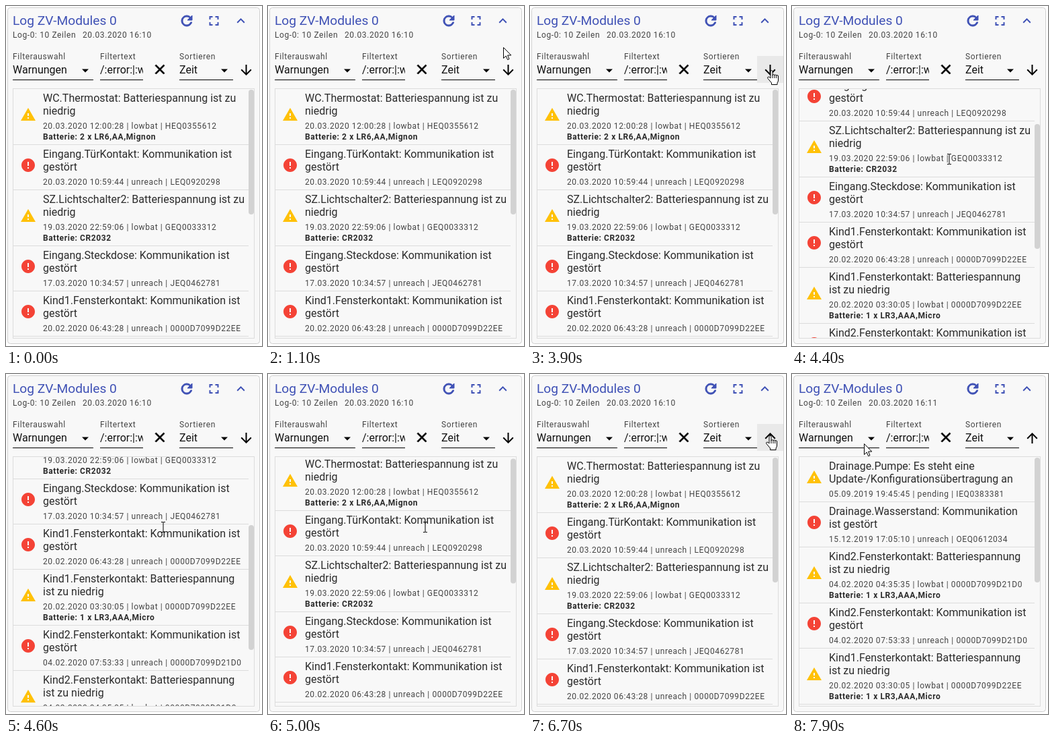
Write an HTML page that moves like this. It is 381x504 px and loops after 8000 ms.

```html
<!DOCTYPE html>
<html lang="de">
<head>
<meta charset="utf-8">
<style>
  html, body { margin: 0; width: 100%; height: 100%; overflow: hidden; background: #fff; }
  svg { display: block; }
  text { font: 16px Roboto, sans-serif; fill: #2b2b2b; white-space: pre; }
  .title { font-size: 19.2px; fill: #3f51b5; }
  .small { font-size: 12px; letter-spacing: .6px; fill: #444; }
  .bold { font-weight: 700; fill: #2b2b2b; }
  .value { fill: #111; }
  .blue { fill: #3f51b5; }
  .warn { fill: #ffc107; }
  .error { fill: #f44336; }
  .cursor path { fill: #fff; stroke: #000; stroke-linejoin: round; }
</style>
</head>
<body>
<svg id="stage" width="381" height="504" viewBox="0 0 381 504"></svg>
<script>
const ICONS = {
  refresh: 'M17.65 6.35C16.2 4.9 14.21 4 12 4c-4.42 0-7.99 3.58-7.99 8s3.57 8 7.99 8c3.73 0 6.84-2.55 7.73-6h-2.08c-.82 2.33-3.04 4-5.65 4-3.31 0-6-2.69-6-6s2.69-6 6-6c1.66 0 3.14.69 4.22 1.78L13 11h7V4l-2.35 2.35z',
  full: 'M7 14H5v5h5v-2H7v-3zm-2-4h2V7h3V5H5v5zm12 7h-3v2h5v-5h-2v3zM14 5v2h3v3h2V5h-5z',
  chevron: 'M7.41 15.41L12 10.83l4.59 4.58L18 14l-6-6-6 6z',
  close: 'M19 6.41L17.59 5 12 10.59 6.41 5 5 6.41 10.59 12 5 17.59 6.41 19 12 13.41 17.59 19 19 17.59 13.41 12z',
  down: 'M20 12l-1.41-1.41L13 16.17V4h-2v12.17l-5.58-5.59L4 12l8 8 8-8z',
  caret: 'M7 9.5l5 5 5-5z',
  warn: 'M1 21h22L12 2 1 21zm12-3h-2v-2h2v2zm0-4h-2v-4h2v4z',
  error: 'M12 2C6.48 2 2 6.48 2 12s4.48 10 10 10 10-4.48 10-10S17.52 2 12 2zm1 15h-2v-2h2v2zm0-4h-2V7h2v6z'
};

// device | first line | second line | details | battery
const ITEMS = [
  'WC.Thermostat: Batteriespannung ist zu;niedrig;20.03.2020 12:00:28 | lowbat | HEQ0355612;2 x LR6,AA,Mignon',
  'Eingang.TürKontakt: Kommunikation ist;gestört;20.03.2020 10:59:44 | unreach | LEQ0920298',
  'SZ.Lichtschalter2: Batteriespannung ist zu;niedrig;19.03.2020 22:59:06 | lowbat | GEQ0033312;CR2032',
  'Eingang.Steckdose: Kommunikation ist;gestört;17.03.2020 10:34:57 | unreach | JEQ0462781',
  'Kind1.Fensterkontakt: Kommunikation ist;gestört;20.02.2020 06:43:28 | unreach | 0000D7099D22EE',
  'Kind1.Fensterkontakt: Batteriespannung;ist zu niedrig;20.02.2020 03:30:05 | lowbat | 0000D7099D22EE;1 x LR3,AAA,Micro',
  'Kind2.Fensterkontakt: Kommunikation ist;gestört;04.02.2020 07:53:33 | unreach | 0000D7099D21D0',
  'Kind2.Fensterkontakt: Batteriespannung;ist zu niedrig;04.02.2020 04:35:35 | lowbat | 0000D7099D21D0;1 x LR3,AAA,Micro',
  'Drainage.Wasserstand: Kommunikation;ist gestört;15.12.2019 17:05:10 | unreach | OEQ0612034',
  'Drainage.Pumpe: Es steht eine;Update-/Konfigurationsübertragung an;05.09.2019 19:45:45 | pending | IEQ0383381'
];

const text = (x, y, s, cls = '') => `<text x="${x}" y="${y}" class="${cls}">${s}</text>`;
const icon = (name, cx, cy, attrs = '') =>
  `<path d="${ICONS[name]}" transform="translate(${cx - 12} ${cy - 12})" ${attrs}/>`;
const rect = (x, y, w, h, fill, attrs = '') =>
  `<rect x="${x}" y="${y}" width="${w}" height="${h}" fill="${fill}" ${attrs}/>`;

function list(items) {
  let y = 123;
  return items.map(item => {
    const [head, rest, info, battery] = item.split(';');
    const h = battery ? 83 : 67, top = y;
    const kind = info.includes('unreach') ? 'error' : 'warn';
    y += h;
    return icon(kind, 33, top + h / 2 - 3.5, `class="${kind}"`) +
      text(55, top + 19, head) + text(55, top + 38, rest) +
      text(55, top + 59, info, 'small') +
      (battery ? text(55, top + 75, 'Batterie: ' + battery, 'small bold') : '') +
      rect(11, top + h - 1, 350, 1, '#dcdcdc');
  }).join('');
}

stage.innerHTML = `
  <clipPath id="view"><rect x="11" y="123" width="359" height="369"/></clipPath>
  <clipPath id="field"><rect x="140" y="80" width="64" height="28"/></clipPath>
  ${rect(2.5, 2.5, 375, 498, '#f8f8f8', 'rx="4" stroke="#cfcfcf"')}
  ${text(10, 28, 'Log ZV-Modules 0', 'title')}
  ${text(10, 47, 'Log-0: 10 Zeilen', 'small')}
  <text id="clock" x="114" y="47" class="small"></text>
  ${icon('refresh', 269, 22, 'class="blue" stroke="#3f51b5"')}
  ${icon('full', 309.5, 22, 'class="blue"')}
  ${icon('chevron', 349.5, 22, 'class="blue"')}
  ${text(10, 79, 'Filterauswahl', 'small')}
  ${text(140, 79, 'Filtertext', 'small')}
  ${text(258, 79, 'Sortieren', 'small')}
  ${text(10, 100, 'Warnungen', 'value')}
  <g clip-path="url(#field)">${text(140, 100, '/:error:|:warn', 'value')}</g>
  ${text(258, 100, 'Zeit', 'value')}
  ${icon('caret', 118, 96)}${icon('caret', 325, 96)}
  ${rect(10, 109, 120, 1, '#000')}${rect(140, 109, 64, 1, '#000')}
  ${rect(258, 109, 80, 1, '#000', 'id="line"')}
  ${icon('close', 229, 94, 'stroke="#000" stroke-width=".8"')}
  ${rect(338, 74, 39, 40, '#e9e9e9', 'id="button"')}
  <g id="arrow">${icon('down', 357.5, 95)}</g>
  ${rect(10.5, 122.5, 359, 370, 'none', 'stroke="#dcdcdc"')}
  <g clip-path="url(#view)">
    <g id="newest">${list(ITEMS)}</g>
    <g id="oldest">${list([...ITEMS].reverse())}</g>
    ${rect(361, 124, 8, 185, '#d2d2d2', 'rx="4" id="thumb"')}
  </g>
  <g id="cursor" class="cursor">
    <path id="pointer" d="M.5.5V16.5L4.2 13 6.6 18.6 9 17.6 6.6 12H11.8Z"/>
    <g id="hand" transform="translate(-6.5 0)">
      <path d="M5 12V2q0-1.5 1.5-1.5T8 2v6q0-1.4 1.5-1.4T11 8q0-1 1.4-1t1.4 1.4q0-.8 1.3-.8T16.5 9v6q0 2-1.5 4v2.5H6.5V19L1 12.5Q0 10.5 1.5 10T5 12ZM8 8v4M11 8v4M13.8 8.4V12"/>
    </g>
    <path id="beam" style="fill:none" d="M-3-7.5h2.5l.5.5.5-.5H3M0-7V7M-3 7.5h2.5L0 7l.5.5H3"/>
  </g>`;

const MOVES = [
  [1000, 366, 38], [1200, 334, 84], [1500, 298, 126], [2000, 298, 126],
  [2100, 297, 108], [2300, 318, 90], [2600, 359.5, 91], [3800, 359.5, 91],
  [3900, 359.5, 95], [4000, 290, 165], [4100, 234, 227], [5300, 234, 227],
  [5800, 310, 140], [6200, 357.5, 91], [7500, 357.5, 91],
  [7600, 345, 100], [7700, 262, 114], [7800, 150, 110], [7900, 107, 103]
];
const SCROLL = [
  [4200, 0], [4300, 20], [4400, 102], [4500, 180], [4600, 200],
  [4800, 200], [4900, 90], [5000, 3], [5100, 0]
];

function at(keys, t) {
  const i = keys.findIndex(k => k[0] >= t);
  if (i < 0) return keys[keys.length - 1].slice(1);
  if (i === 0) return keys[0].slice(1);
  const a = keys[i - 1], b = keys[i], p = (t - a[0]) / (b[0] - a[0]);
  return a.slice(1).map((v, n) => v + (b[n + 1] - v) * p);
}

const $ = id => document.getElementById(id);
const show = (id, on) => $(id).setAttribute('display', on ? 'inline' : 'none');
const move = (id, x, y) => $(id).setAttribute('transform', `translate(${x} ${y})`);

function draw(now) {
  const t = Math.floor(now % 8000 / 100) * 100;
  const [x, y] = at(MOVES, t), [scroll] = at(SCROLL, t);
  const visible = t >= 1000, sorted = t >= 6900;
  const onButton = visible && x > 338 && y > 74 && y < 114;
  const onText = y > 127;
  const onSort = visible && x > 258 && x < 338 && y > 65 && y < 127;

  show('cursor', visible);
  move('cursor', x, y);
  show('hand', onButton);
  show('beam', onText);
  show('pointer', !onButton && !onText);
  show('button', onButton);
  $('line').setAttribute('height', onSort ? 2 : 1);
  $('arrow').setAttribute('transform', t >= 6400 ? 'rotate(180 357.5 95)' : '');

  show('newest', !sorted);
  show('oldest', sorted);
  move('newest', 0, -scroll);
  move('thumb', 0, scroll / 2);
  $('clock').textContent = '20.03.2020 16:1' + (sorted ? 1 : 0);
  requestAnimationFrame(draw);
}
requestAnimationFrame(draw);
</script>
</body>
</html>
```
